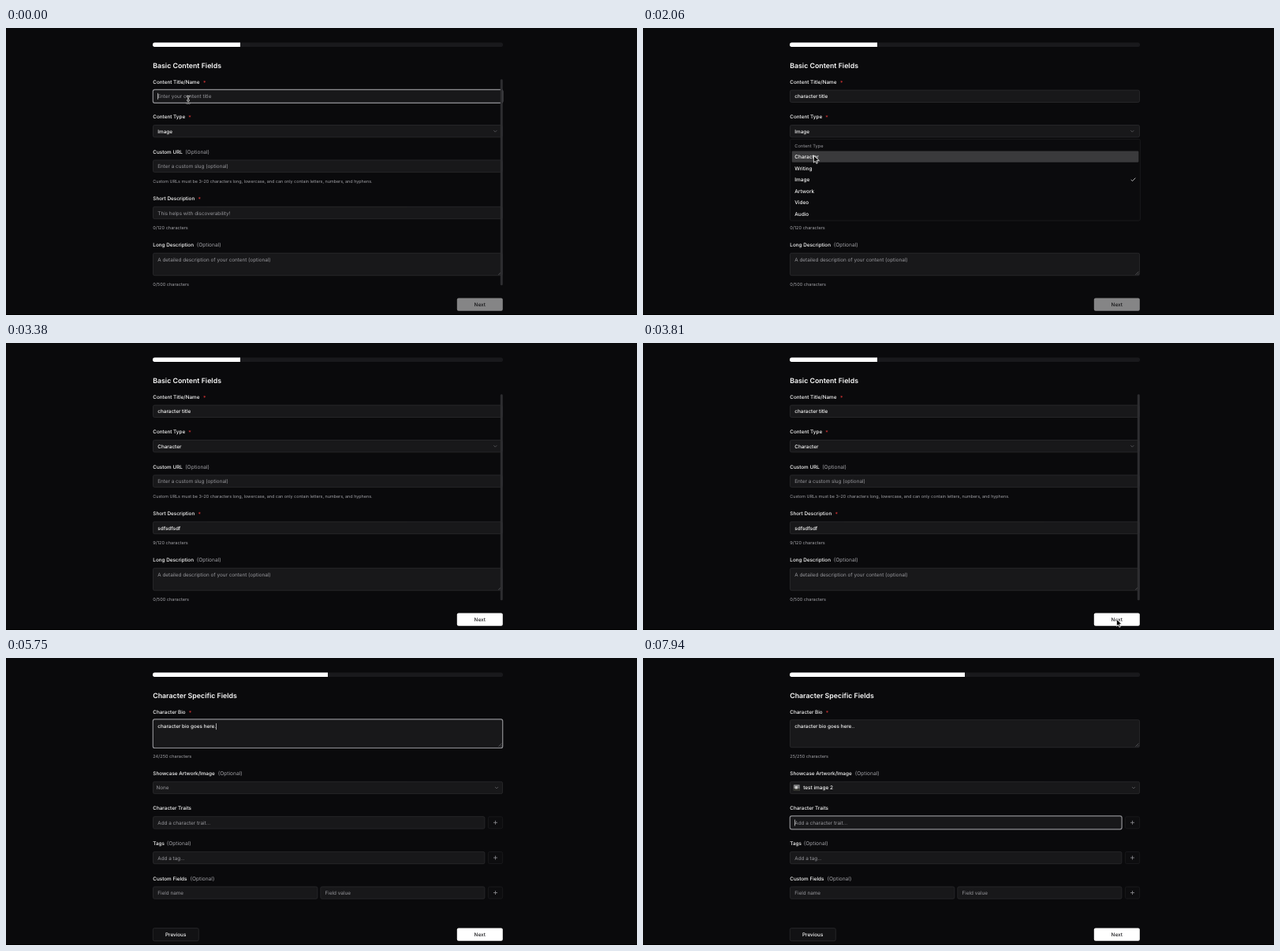
Recreate the animation shown at these times as an HTML page. Size 800x365 px, loop 8 s.

```html
<!DOCTYPE html>
<html lang="en">
<head>
<meta charset="utf-8">
<title>Content form</title>
<style>
  html, body { margin: 0; width: 100%; height: 100%; overflow: hidden; background: #0a0a0c; }
  svg { display: block; width: 100vw; height: 100vh; }
  text { font: 400 6.35px Inter, "Open Sans", sans-serif; fill: #fafafa; text-rendering: geometricPrecision; white-space: pre; }
  .title { font-size: 8.8px; font-weight: 600; }
  .label, .value, .button { font-weight: 500; }
  .item { font-size: 6.45px; font-weight: 500; }
  .opt { font-size: 6.6px; fill: #a1a1a6; }
  .hint { font-size: 5.41px; fill: #a1a1a6; }
  .count { font-size: 5.6px; fill: #a1a1a6; }
  .ph { fill: #98989d; }
  .long { font-size: 6.28px; fill: #98989d; }
  .head { font-size: 5.7px; fill: #98989d; }
  .star { font-size: 7px; fill: #dc3434; }
  .button { text-anchor: middle; }
  .dark { fill: #18181b; }
</style>
</head>
<body>
<svg id="stage" viewBox="0 0 800 365"></svg>
<script>
const LOOP = 8000, LEFT = 186, RIGHT = 630;
const stage = document.getElementById('stage');
const pen = document.createElement('canvas').getContext('2d');

const TITLE = { text: 'character title', start: 380, step: 57 };
const SHORT = { text: 'sdfsdfsdf', start: 2720, step: 48 };
const BIO = { text: 'character bio goes here..', start: 4820, step: 39, lastAt: 5840 };
const TURN = 3880;

// Pointer runs: shape, then [time, x, y] stops
const POINTER = [
  ['beam', [[0, 231, 91], [60, 231, 91], [300, 232, 94], [380, 232, 94]]],
  ['arrow', [[1380, 240, 104], [1520, 226, 128], [1590, 226, 129], [1750, 216, 162], [2150, 216, 162], [2480, 226, 225]]],
  ['beam', [[2480, 226, 228], [2600, 228, 235], [2720, 228, 235]]],
  ['arrow', [[3180, 260, 262], [3360, 330, 372]]],
  ['arrow', [[3560, 520, 372], [3760, 600, 351], [3890, 600, 351], [4120, 612, 372]]],
  ['arrow', [[6060, 250, 140], [6260, 214, 163], [6360, 214, 163], [6560, 208, 190], [6700, 206.5, 195.5], [7310, 206.5, 195.5], [7500, 216, 203]]],
  ['beam', [[7500, 216, 205], [7620, 220, 210], [7850, 220, 210]]]
];

const clamp = v => Math.max(0, Math.min(1, v));
const ease = v => v * v * (3 - 2 * v);
const mix = (a, b, v) => a + (b - a) * v;
const between = (t, a, b) => t >= a && t < b;

const text = (x, y, s, cls) => `<text x="${x}" y="${y}" class="${cls}">${s}</text>`;
const rect = (x, y, w, h, fill, extra = '') => `<rect x="${x}" y="${y}" width="${w}" height="${h}" fill="${fill}" ${extra}/>`;
const path = (d, stroke, width = .7) => `<path d="${d}" fill="none" stroke="${stroke}" stroke-width="${width}"/>`;
const chevron = (x, y) => path(`M${x - 2} ${y - 1}l2 2l2 -2`, '#68686c');
const tick = y => path(`M618.7 ${y}l1.8 1.9l3.8 -4`, '#d8d8da', .8);

function typed(field, t) {
  const { text: s, start, step, lastAt } = field;
  if (t < start) return '';
  if (lastAt) return t >= lastAt ? s : s.slice(0, Math.min(s.length - 1, Math.floor((t - start) / step) + 1));
  return s.slice(0, Math.floor((t - start) / step) + 1);
}

function caret(t, s, field, focusAt, y) {
  const end = field ? field.lastAt || field.start + (field.text.length - 1) * field.step : Infinity;
  const since = s ? Math.max(0, t - end) : t - focusAt;
  if (since % 1060 >= 530) return '';
  pen.font = '500 100px Inter, "Open Sans", sans-serif';
  const x = 192.3 + pen.measureText(s).width * .0635;
  return rect(x, y - 4, .6, 8, '#fff');
}

function box(x, y, w, h, focus) {
  const field = rect(x + .5, y + .5, w - 1, h - 1, '#18181a', 'rx="1.8" stroke="#2b2b2e" stroke-width=".8"');
  if (!focus) return field;
  return field + rect(x + .3, y - .3, w - .6, h + .6, 'none', 'rx="2.3" stroke="#8c8c90" stroke-width="1.2"');
}

const grip = y => path(`M624.5 ${y}l4 -4M627 ${y}l1.5 -1.5`, '#77777b', .6);

function label(y, s, extraX, extra) {
  const more = extra === '*' ? text(extraX, y + 1.2, '*', 'star') : extra ? text(extraX, y, extra, 'opt') : '';
  return text(LEFT + .3, y, s, 'label') + more;
}

function button(x, s, on) {
  const look = s === 'Previous' ? ['#121214', '', 'button'] : ['#fff', `opacity="${on}"`, 'button dark'];
  const edge = s === 'Previous' ? 'stroke="#2b2b2e" stroke-width=".8"' : '';
  return `<g ${look[1]}>` + rect(x + .3, 343.6, 58, 16.2, look[0], `rx="2" ${edge}`) + text(x + 29.2, 354, s, look[2]) + '</g>';
}

function plus(y) {
  return rect(611.4, y + .5, 18.2, 15, '#0d0d0f', 'rx="1.8" stroke="#1c1c1f" stroke-width=".8"') +
    path(`M618 ${y + 8}h5M620.5 ${y + 5.5}v5`, '#a0a0a4', .7);
}

function thumb(x, y, kind) {
  const [base, low, light] = [['#77787a', '#33342f', '#d0d0ce'], ['#8d8078', '#51453f', '#c2b8b0'], ['#231d17', '#c9a565', '#eee8dc']][kind];
  return rect(x, y, 8, 8, base, 'rx="1"') + rect(x, y + 5, 8, 3, low) + rect(x + 2, y + 2, 3, 3.5, light);
}

function menu(y, h, first, items, chosen, pointerY, alpha) {
  const row = Math.floor((pointerY - first) / 14.6);
  const hot = row >= 0 && row < items.length ? row : chosen;
  let out = `<g opacity="${alpha}">` + rect(LEFT + .4, y, 444, h, '#0b0b0d', 'rx="2" stroke="#1d1d20" stroke-width=".8"');
  out += rect(188.8, first + hot * 14.6, 439.6, 14.4, '#3a3a3c', 'rx="1.2"');
  out += tick(first + 7.2 + chosen * 14.6);
  items.forEach((item, i) => {
    const base = first + i * 14.6 + 9.6;
    if (item.thumb === undefined) out += text(192.3, base, item.name, item.name === 'None' ? 'ph' : 'item');
    else out += thumb(192.5, base - 6.4, item.thumb) + text(204.8, base, item.name, 'item');
  });
  return out;
}

const fade = (t, open, close) => Math.min(clamp((t - open) / 110), clamp((close + 100 - t) / 100));

const TYPES = ['Character', 'Writing', 'Image', 'Artwork', 'Video', 'Audio'].map(name => ({ name }));
const IMAGES = [{ name: 'None' }, { name: 'test image 2', thumb: 0 }, { name: 'test image', thumb: 1 }, { name: 'sdfsdfsdf', thumb: 2 }];

function basics(t, py) {
  const title = typed(TITLE, t), short = typed(SHORT, t);
  const onTitle = t < 1560, onShort = between(t, 2600, 3300);
  const ready = .5 + .5 * clamp((t - SHORT.start) / 150);
  let out = text(LEFT + .2, 51, 'Basic Content Fields', 'title');

  out += label(70.5, 'Content Title/Name', 250, '*') + box(LEFT, 78.6, 444, 16.4, onTitle);
  out += title ? text(192.3, 89.1, title, 'value') : text(192.3, 89.1, 'Enter your content title', 'ph');
  if (onTitle) out += caret(t, title, TITLE, 0, 86.8);

  out += label(115.2, 'Content Type', 231.2, '*') + box(LEFT, 123, 444, 16.3);
  out += text(192.3, 133.6, t < 2150 ? 'Image' : 'Character', 'value') + chevron(620.3, 131.2);

  out += label(159.6, 'Custom URL', 227.2, '(Optional)') + box(LEFT, 167.5, 444, 16.3);
  out += text(192.3, 178.1, 'Enter a custom slug (optional)', 'ph');
  out += text(LEFT + .3, 197.1, 'Custom URLs must be 3–20 characters long, lowercase, and can only contain letters, numbers, and hyphens.', 'hint');

  out += label(218.8, 'Short Description', 243.5, '*') + box(LEFT, 226.8, 444, 16.4, onShort);
  out += short ? text(192.3, 237.5, short, 'value') : text(192.3, 237.5, 'This helps with discoverability!', 'ph');
  if (onShort) out += caret(t, short, SHORT, 2600, 235);
  out += text(LEFT + .3, 256.3, short.length + '/120 characters', 'count');

  out += label(278.2, 'Long Description', 241.8, '(Optional)') + box(LEFT, 285.8, 444, 29.4) + grip(313.8);
  out += text(192.3, 297.3, 'A detailed description of your content (optional)', 'ph');
  out += text(LEFT + .3, 328.2, '0/500 characters', 'count');
  out += button(571.5, 'Next', ready);

  if (between(t, 1560, 2250)) {
    out += menu(141.4, 103.6, 156.4, TYPES, t < 2150 ? 2 : 0, py, fade(t, 1560, 2150));
    out += text(192.3, 152.2, 'Content Type', 'head') + '</g>';
  } else out += rect(626.8, 65.3, 3, 262, '#2d2d30', 'rx="1.4"');
  return out;
}

function character(t, py) {
  const bio = typed(BIO, t);
  const onBio = between(t, 4000, 6340), onTrait = t >= 7600;
  const picked = t >= 6920;
  const enabledAt = BIO.start + 10 * BIO.step;
  let out = text(LEFT + .2, 51, 'Character Specific Fields', 'title');

  out += label(70.5, 'Character Bio', 231.8, '*') + box(LEFT, 78.2, 444, 36, onBio) + grip(112.6);
  out += bio ? text(192.3, 89.4, bio, 'value')
    : text(192.3, 89.4, 'Write a summary about your character. You can expand onto this by creating writing content and linking it to this character!', 'long');
  if (onBio) out += caret(t, bio, BIO, 4000, 87.1);
  out += text(LEFT + .3, 127.1, bio.length + '/250 characters', 'count');

  out += label(148.8, 'Showcase Artwork/Image', 268.8, '(Optional)') + box(LEFT, 156.8, 444, 16.3);
  out += picked ? thumb(190.8, 161, 0) + text(203.2, 167.4, 'test image 2', 'item') : text(190.4, 167.4, 'None', 'ph');
  out += chevron(622, 165);

  out += label(193.3, 'Character Traits') + box(LEFT, 201.2, 421.4, 16.4, onTrait) + plus(201.3);
  out += text(192.3, 212, 'Add a character trait...', 'ph');
  if (onTrait) out += caret(t, '', null, 7600, 209.5);

  out += label(238, 'Tags', 203.8, '(Optional)') + box(LEFT, 245.9, 421.4, 16.3) + plus(246);
  out += text(192.3, 256.6, 'Add a tag...', 'ph');

  out += label(282.6, 'Custom Fields', 233.5, '(Optional)') + box(LEFT, 290.4, 209.4, 16.3) + box(398.3, 290.4, 209.1, 16.3) + plus(290.5);
  out += text(192.3, 301.1, 'Field name', 'ph') + text(404.6, 301.1, 'Field value', 'ph');
  out += button(LEFT, 'Previous') + button(571.5, 'Next', .5 + .5 * clamp((t - enabledAt) / 150));

  if (between(t, 6340, 7020)) out += menu(175.6, 61.6, 177.2, IMAGES, picked ? 1 : 0, py, fade(t, 6340, 6920)) + '</g>';
  return out;
}

function pointerAt(t) {
  for (const [kind, stops] of POINTER) {
    for (let i = 1; i < stops.length; i++) {
      const [a, ax, ay] = stops[i - 1], [b, bx, by] = stops[i];
      if (between(t, a, b)) {
        const v = ease((t - a) / (b - a));
        return { kind, x: mix(ax, bx, v), y: mix(ay, by, v) };
      }
    }
  }
  return null;
}

function pointer(p) {
  if (!p) return '';
  const at = `<g transform="translate(${p.x} ${p.y})" stroke-linejoin="round" stroke-linecap="round">`;
  if (p.kind === 'arrow') {
    return at + '<path d="M.4 .4V9.2L2.5 7.2L3.9 10.4L5.4 9.8L4.1 6.7H7Z" fill="#000" stroke="#fff" stroke-width=".8"/></g>';
  }
  const beam = 'M-1.6 -4.4Q0 -4.4 0 -3Q0 -4.4 1.6 -4.4M0 -3V3.2M-1.6 4.6Q0 4.6 0 3.2Q0 4.6 1.6 4.6M-1 .9H1';
  return at + path(beam, '#fff', 1.7) + path(beam, '#000', .7) + '</g>';
}

function progress(t) {
  const w = mix(111, 222, ease(clamp((t - TURN) / 300)));
  return rect(LEFT, 18.6, RIGHT - LEFT, 5.4, '#19191c', 'rx="2.5"') +
    `<path d="M188.5 18.6H${LEFT + w}V24H188.5A2.5 2.7 0 0 1 188.5 18.6Z" fill="#fff"/>`;
}

function draw(t) {
  const p = pointerAt(t);
  const page = t < TURN ? basics : character;
  stage.innerHTML = rect(0, 0, 800, 365, '#0a0a0c') + rect(0, 364, 800, 1, '#000') +
    progress(t) + page(t, p ? p.y : -1) + pointer(p);
}

const begin = performance.now();
function tickFrame() {
  draw((performance.now() - begin) % LOOP);
  requestAnimationFrame(tickFrame);
}
tickFrame();
</script>
</body>
</html>
```
